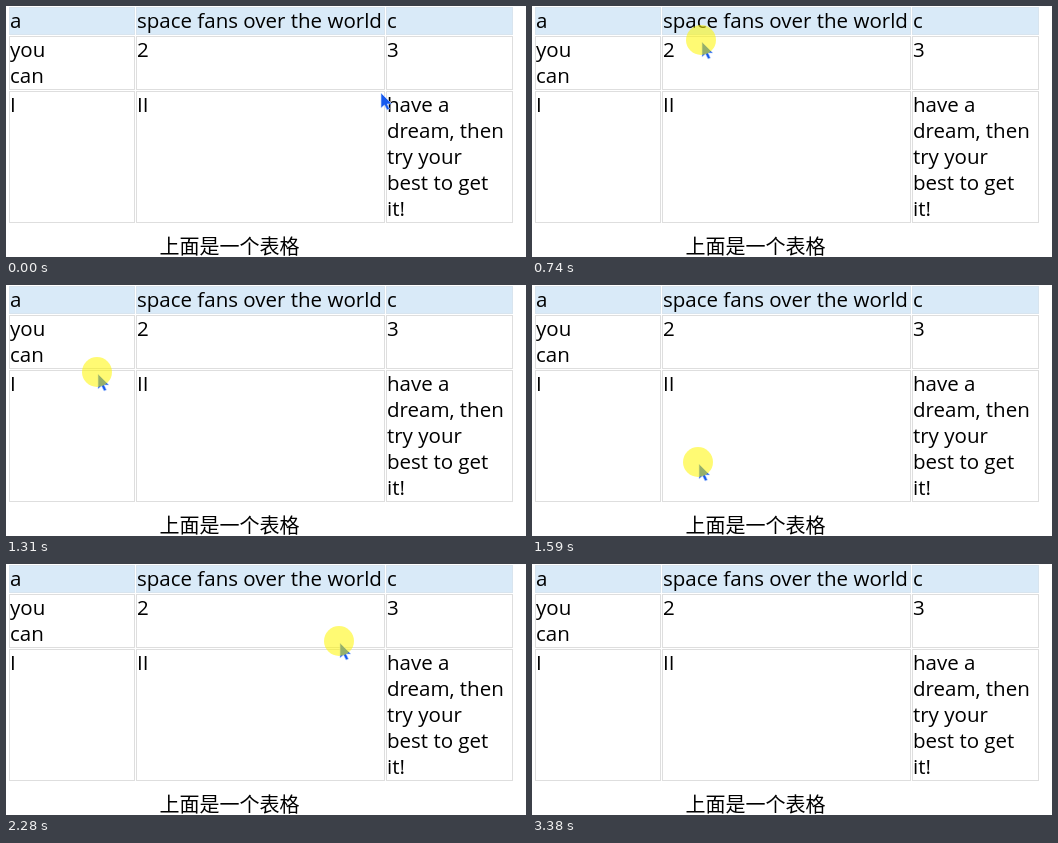
Write an HTML page with a canvas that moves like this. It is 520x251 px and loops after 4.59 s.

```html
<!DOCTYPE html>
<html lang="zh">
<head>
<meta charset="utf-8">
<title>表格</title>
<style>
html, body { margin: 0; width: 100%; height: 100%; overflow: hidden; background: #fff; }
canvas { display: block; }
</style>
</head>
<body>
<canvas id="stage" width="520" height="251"></canvas>
<script>
const ctx = document.getElementById('stage').getContext('2d');
const LOOP = 4590;
const HIDE_AT = 3380;
const STEP = 66; // shortest time between two pointer positions
const LINE = 26;
const GAP = 1;

const widths = [126, 249, 127];
const rows = [
  ['a', 'space fans over the world', 'c'],
  ['you\ncan', '2', '3'],
  ['I', 'II', 'have a\ndream, then\ntry your\nbest to get\nit!']
].map(row => row.map(text => text.split('\n')));

// Turning points of the pointer tip: [ms, x, y]
const path = [
  [0, 375, 87], [540, 305, 44], [740, 170, 36], [1100, 97, 76],
  [1310, 92, 89], [1660, 198, 195], [1860, 361, 212], [2000, 414, 172],
  [2210, 367, 96], [2280, 334, 79], [2630, 205, 62], [2760, 220, 77],
  [2890, 220, 77], [3310, 415, 232]
];

// Tangent that keeps the curve from overshooting its key points
function slope(i, axis) {
  const d = k => (path[k + 1][axis] - path[k][axis]) / (path[k + 1][0] - path[k][0]);
  if (i === 0) return d(0);
  if (i === path.length - 1) return d(i - 1);
  const a = d(i - 1), b = d(i);
  return a * b <= 0 ? 0 : 2 * a * b / (a + b);
}

// Cubic path, sampled in equal steps within each stretch
function pointAt(t) {
  let i = 0;
  while (i < path.length - 2 && t >= path[i + 1][0]) i++;
  const p = path[i], q = path[i + 1];
  const h = q[0] - p[0];
  const n = Math.floor(h / STEP);
  const u = Math.min(1, Math.floor((t - p[0]) / h * n + 0.02) / n);
  const v = 1 - u;
  return [1, 2].map(k => Math.round(
    p[k] * (1 + 2 * u) * v * v + slope(i, k) * h * u * v * v +
    q[k] * (3 - 2 * u) * u * u - slope(i + 1, k) * h * u * u * v));
}

function drawCell(lines, x, y, w, h, isHead) {
  ctx.fillStyle = isHead ? '#d9eaf8' : '#fff';
  ctx.fillRect(x, y, w, h);
  ctx.strokeStyle = isHead ? '#d8e4ee' : '#dedede';
  ctx.strokeRect(x + 0.5, y + 0.5, w - 1, h - 1);
  ctx.fillStyle = '#000';
  lines.forEach((s, i) => ctx.fillText(s, x + 1, y + 21.4 + i * LINE));
}

function drawTable() {
  ctx.fillStyle = '#fff';
  ctx.fillRect(0, 0, 520, 251);
  ctx.lineWidth = 1;
  ctx.font = '20.5px "Open Sans", "Noto Sans", sans-serif';
  let y = 1;
  rows.forEach((row, r) => {
    const h = Math.max(...row.map(lines => lines.length)) * LINE + 2;
    let x = 3;
    row.forEach((lines, c) => {
      drawCell(lines, x, y, widths[c], h, r === 0);
      x += widths[c] + GAP;
    });
    y += h + GAP;
  });
  ctx.font = '20px "Noto Sans CJK SC", "Noto Sans CJK", sans-serif';
  ctx.fillText('上面是一个表格', 153.5, 248.4);
}

function drawPointer([x, y], lit) {
  const arrow = [[0, 0], [0, 15], [3.5, 12], [6, 17], [8.5, 16], [6.2, 11], [11, 11]];
  ctx.beginPath();
  arrow.forEach(([dx, dy]) => ctx.lineTo(x + dx, y + dy));
  ctx.closePath();
  ctx.fillStyle = '#1659ee';
  ctx.fill();
  ctx.strokeStyle = 'rgba(205, 222, 255, 0.8)';
  ctx.lineWidth = 0.8;
  ctx.stroke();
  if (!lit) return;
  ctx.beginPath();
  ctx.arc(x - 1, y - 2, 15, 0, Math.PI * 2);
  ctx.fillStyle = 'rgba(255, 246, 0, 0.55)';
  ctx.fill();
}

function draw(t) {
  drawTable();
  if (t < HIDE_AT) drawPointer(pointAt(t), t >= STEP);
}

const begin = performance.now();
function frame() {
  draw((performance.now() - begin) % LOOP);
  requestAnimationFrame(frame);
}
frame();
</script>
</body>
</html>
```
